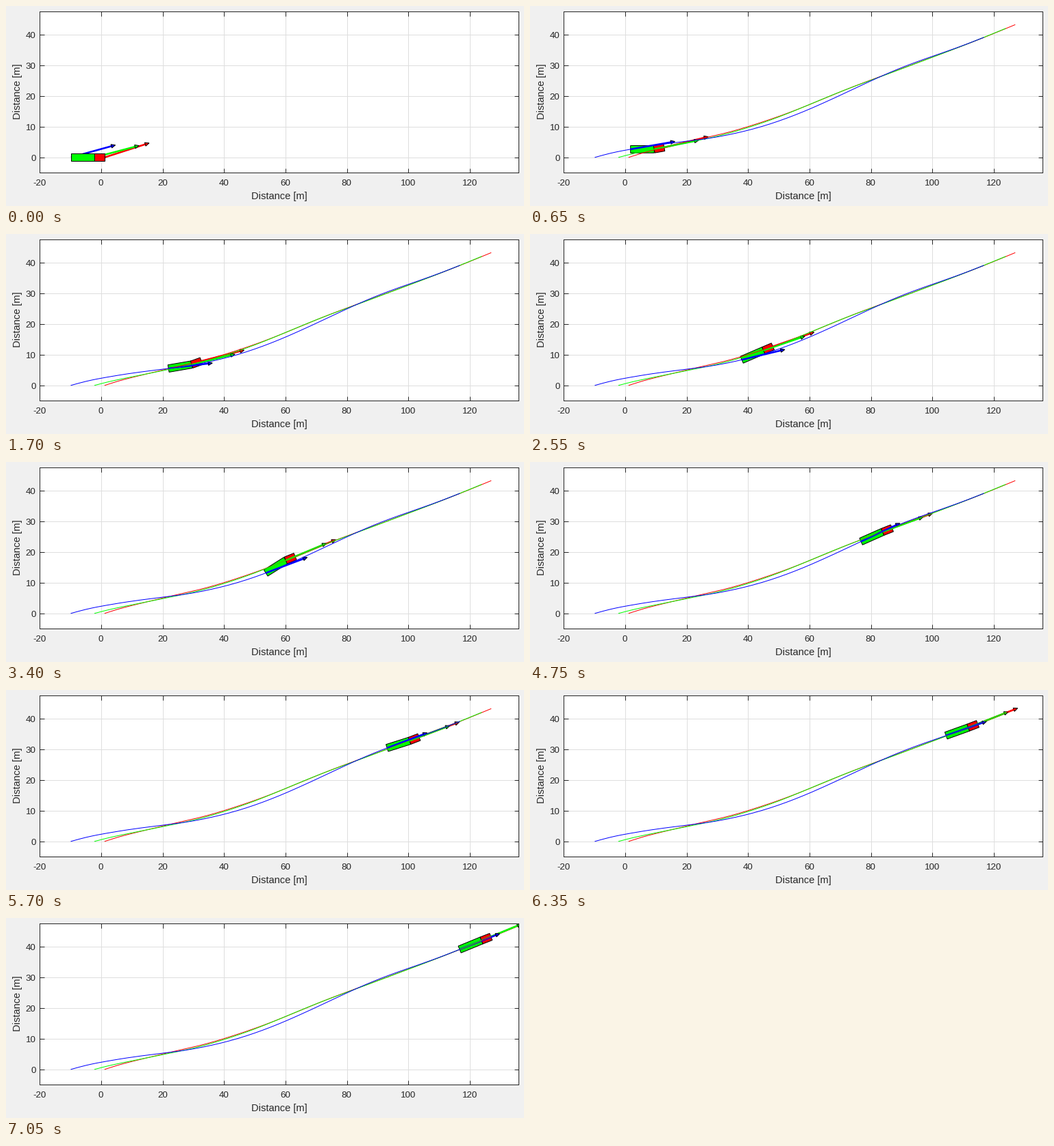
Write a matplotlib script that moves like this. It is 756 by 293 pixels and loops after 7100 ms.

```python
import numpy as np
import matplotlib.pyplot as plt
from matplotlib.animation import FuncAnimation

W, H = 756, 293
DPI = 64
PT = 72 / DPI                      # points per pixel
STEPS = 141
FRONT, REAR, HALF = 3.3, 7.7, 1.2  # vehicle dimensions in metres
RED, GREEN, BLUE = "#ff0000", "#00ff00", "#0000ff"
INK = "#262626"

plt.rcParams["font.family"] = "Liberation Sans"


def spline(knots, x):
    """Natural cubic spline through (x, y) knots."""
    kx, ky = np.array(knots, float).T
    n, h = len(kx), np.diff(kx)
    a, b = np.eye(n), np.zeros(n)
    for i in range(1, n - 1):
        a[i, i - 1:i + 2] = h[i - 1], 2 * (h[i - 1] + h[i]), h[i]
        b[i] = 6 * ((ky[i + 1] - ky[i]) / h[i] - (ky[i] - ky[i - 1]) / h[i - 1])
    m = np.linalg.solve(a, b)
    i = np.clip(np.searchsorted(kx, x) - 1, 0, n - 2)
    u, v, d = kx[i + 1] - x, x - kx[i], h[i]
    return ((m[i] * u**3 + m[i + 1] * v**3) / (6 * d)
            + (ky[i] / d - m[i] * d / 6) * u
            + (ky[i + 1] / d - m[i + 1] * d / 6) * v)


def heading(deg):
    r = np.radians(deg)
    return np.column_stack([np.cos(r), np.sin(r)])


# Motion: hitch path plus the headings of tractor and trailer.
step = np.arange(STEPS, dtype=float)
hitch_x = spline([(0, -2.1), (12, 9.45), (33, 29.5), (67, 60.1),
                  (94, 83.8), (113, 100.4), (140, 123.8)], step)
hitch_y = spline([(-2.1, 0), (3, 1.3), (9.45, 2.65), (16, 4), (22, 5.2),
                  (29.5, 6.8), (40, 9.75), (50, 13.2), (60.1, 17.3),
                  (70, 21.4), (83.8, 26.6), (100.4, 32.85), (110, 36.5),
                  (123.8, 42.1)], hitch_x)
tractor_dir = heading(spline([(0, 0), (4, 3.8), (12, 10), (22, 16), (33, 20),
                              (44, 22.4), (55, 23), (67, 22.2), (94, 21.6),
                              (113, 21.2), (140, 21.5)], step))
trailer_dir = heading(spline([(0, 0), (10, -.2), (21, 3), (31, 8.3),
                              (41.5, 17), (52, 24.8), (63, 31), (74.5, 33),
                              (86, 28.8), (94, 24), (102, 20), (111, 17.8),
                              (121, 18.6), (132, 21.3), (140, 22.4)], step))
hitch = np.column_stack([hitch_x, hitch_y])
front = hitch + FRONT * tractor_dir
rear = hitch - REAR * trailer_dir

tracks = [(front, RED), (hitch, GREEN), (rear, BLUE)]
speeds = [15 * np.gradient(p, axis=0) for p, _ in tracks]


def box(a, b, d):
    side = HALF * np.array([-d[1], d[0]])
    return np.array([a + side, b + side, b - side, a - side])


def head(tip, v):
    d = v / np.hypot(*v)
    side = 0.6 * np.array([-d[1], d[0]])
    base = tip - 1.35 * d
    return np.array([tip, base + side, base - side])


fig = plt.figure(figsize=(W / DPI, H / DPI), dpi=DPI, facecolor="#f0f0f0")
L, R, T, B = 49.2, 747.5, 7.5, 243.5
ax = fig.add_axes([L / W, 1 - B / H, (R - L) / W, (B - T) / H])
SCALE = 4.484
ax.set_xlim(-20, -20 + (R - L) / SCALE)
ax.set_ylim((221.7 - B) / SCALE, (221.7 - T) / SCALE)
ax.set_xticks(range(-20, 121, 20))
ax.set_yticks(range(0, 41, 10))
ax.tick_params(direction="in", length=6.5 * PT, width=PT, color=INK,
               top=True, right=True, labelbottom=False, labelleft=False)
ax.set_axisbelow(True)
ax.grid(color="#dedede", lw=PT)
for s in ax.spines.values():
    s.set(color=INK, linewidth=PT)


def label(x, y, text, size, ha="center", **kw):
    fig.text(x / W, 1 - y / H, text, fontsize=size * PT, ha=ha,
             va="baseline", color=INK, **kw)


for x in range(-20, 121, 20):
    label(L + (x + 20) * SCALE - .3, 263, str(x), 13.33)
for y in range(0, 41, 10):
    label(43.5, 226.7 - y * SCALE, str(y), 13.33, ha="right")
label(398.5, 283, "Distance [m]", 14.67)
fig.text(21 / W, 1 - 125.5 / H, "Distance [m]", fontsize=14.67 * PT,
         rotation=90, ha="right", va="center", color=INK).set(
             rotation_mode="anchor", ha="center", va="baseline")

edge = dict(ec="black", lw=PT, joinstyle="miter")
trailer, = ax.fill([0], [0], fc=GREEN, **edge)
tractor, = ax.fill([0], [0], fc=RED, **edge)
shafts, heads, paths = [], [], []
for i, (p, c) in enumerate(tracks):
    z = 2.1 + .05 * i
    shafts += ax.plot([], [], color=c, lw=2.6 * PT, zorder=z,
                      solid_capstyle="butt")
    heads += ax.fill([0], [0], fc=c, zorder=z, **edge)
    paths += ax.plot(*p.T, color=c, lw=PT, zorder=2.3 + .01 * i)


def draw(k):
    n = max(k - 1, 0)
    trailer.set_xy(box(rear[n], hitch[n], trailer_dir[n]))
    tractor.set_xy(box(hitch[n], front[n], tractor_dir[n]))
    # The body covers the arrows until the paths appear.
    for body in (trailer, tractor):
        body.set_zorder(2 if k else 2.28)
    for (p, _), v, shaft, tri, path in zip(tracks, speeds, shafts, heads, paths):
        tip = p[n] + v[n]
        end = tip - .9 * v[n] / np.hypot(*v[n])
        shaft.set_data([p[n, 0], end[0]], [p[n, 1], end[1]])
        tri.set_xy(head(tip, v[n]))
        path.set_visible(k > 0)
    return [trailer, tractor, *shafts, *heads, *paths]


anim = FuncAnimation(fig, draw, frames=STEPS + 1, interval=50,
                     repeat=True, repeat_delay=0, blit=False)
plt.show()
```
